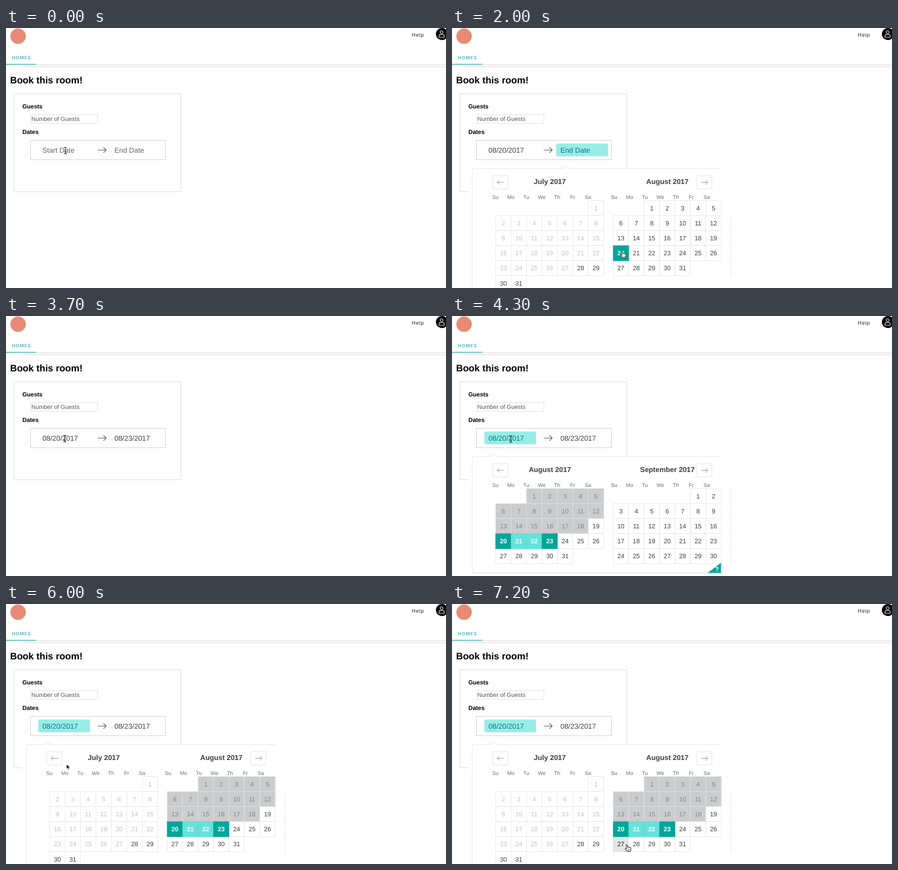
These frames come from a looping animation (912 px wide and 540 px high, 7300 ms). An HTML page:

```html
<!DOCTYPE html>
<html lang="en">
<head>
<meta charset="utf-8">
<title>Book this room</title>
<style>
html, body { margin: 0; width: 100%; height: 100%; overflow: hidden; background: #fff; }
svg { display: block; width: 912px; height: 540px; font-family: "Liberation Sans", Arial, sans-serif; text-rendering: geometricPrecision; }
.round { font-family: Inter, sans-serif; }
</style>
</head>
<body>
<svg viewBox="0 0 912 540" xmlns="http://www.w3.org/2000/svg">
  <defs>
    <clipPath id="panel"><rect x="73" y="293" width="508" height="247"/></clipPath>
  </defs>
  <rect width="912" height="540" fill="#fff"/>
  <circle cx="25" cy="17" r="16" fill="#e98a74"/>
  <text class="round" x="841" y="17.5" font-size="10.5" font-weight="500" letter-spacing=".65" fill="#484848">Help</text>
  <circle cx="903.5" cy="12.5" r="12.5" fill="#000"/>
  <g fill="none" stroke="#fff" stroke-width="1.1">
    <circle cx="903" cy="8.6" r="2.9"/>
    <path d="M897.5 19.2v-2.6a3 3 0 0 1 3-3h5a3 3 0 0 1 3 3v2.6z"/>
  </g>
  <text class="round" x="12" y="64.5" font-size="9.5" font-weight="700" letter-spacing=".9" fill="#62bcc2">HOMES</text>
  <path d="M0 76.5H912M25 80.5H912" stroke="#d2d2d2"/>
  <rect y="74.4" width="63" height="2" fill="#6cc3c9"/>
  <text x="8.5" y="115" font-size="19.6" font-weight="bold">Book this room!</text>
  <rect x="16.5" y="137" width="346" height="203" fill="none" stroke="#d6d6d6"/>
  <g font-size="12.3" font-weight="bold"><text x="34" y="167">Guests</text><text x="34" y="220">Dates</text></g>
  <rect x="51" y="180" width="139.5" height="18" fill="#fff" stroke="#dedede"/>
  <text x="52.5" y="193.3" font-size="12.3" fill="#555">Number of Guests</text>
  <rect x="50.5" y="233.5" width="280" height="40" fill="#fff" stroke="#cacccd"/>
  <path d="M190 253.5h17.5M202 248l5.7 5.5l-5.7 5.5" fill="none" stroke="#484848" stroke-width="1.1"/>
  <g id="view"></g>
</svg>
<script>
const LOOP = 7300, STEP = 100;
const OPEN = 500, PICK_START = 1900, PICK_END = 2800, REOPEN = 3850, NAV = 5650, SLIDE = 250;
const CELL_W = 32, CELL_H = 31.2, TOP = 358.4, LEFT = 90.5, MONTH_W = 243.6;
const MONTHS = ["July", "August", "September", "October"];
const WEEK = ["Su", "Mo", "Tu", "We", "Th", "Fr", "Sa"];
const JUL = 6, AUG = 7;

// time, x, y of the pointer's hot spot
const PATH = [
  [0, 123, 254], [700, 123, 254], [1100, 291, 370], [1450, 378, 444], [1650, 352, 448],
  [1800, 352, 462], [2050, 352, 464], [2450, 446, 467], [2600, 447, 472], [2900, 447, 472],
  [3500, 122, 254], [4500, 122, 255], [5400, 122, 321], [5600, 101, 319], [5900, 101, 319],
  [6400, 335, 448], [6800, 455, 466], [7200, 362, 500], [LOOP, 362, 500]
];

const STYLES = {
  past: ["#fff", "#c0c3c4", "#e4e7e7"],
  blocked: ["#cacccd", "#82888a", "#dfe2e2"],
  open: ["#fff", "#3c3f40", "#e4e7e7"],
  hover: ["#e4e7e7", "#222", "#dcdfdf"],
  ends: ["#00a699", "#fff", "#00a699", "bold"],
  span: ["#66e2da", "#fff", "#4fdcd1", "bold"],
  preview: ["#b2f1ec", "#007a87", "#80e8e0", "bold"]
};

const view = document.getElementById("view");
const ease = u => u * u * (3 - 2 * u);
const clamp = u => Math.max(0, Math.min(1, u));
const inside = (p, x, y, w, h) => p.x >= x && p.x < x + w && p.y >= y && p.y < y + h;

function pointer(t) {
  const i = Math.max(1, PATH.findIndex(k => k[0] >= t));
  const [a, b] = [PATH[i - 1], PATH[i]];
  const u = ease(clamp((t - a[0]) / (b[0] - a[0])));
  return { x: a[1] + (b[1] - a[1]) * u, y: a[2] + (b[2] - a[2]) * u };
}

function stateAt(t) {
  const s = { p: pointer(t) };
  s.open = t >= OPEN && t < PICK_END || t >= REOPEN;
  s.start = t >= PICK_START;
  s.end = t >= PICK_END;
  s.focus = !s.open ? "" : s.start && !s.end ? "end" : "start";
  s.slide = t < REOPEN ? 1 : ease(clamp((t - NAV) / SLIDE));
  s.bottom = 533.5 + CELL_H * s.slide;
  return s;
}

function days(month, x) {
  const first = new Date(2017, month, 1).getDay();
  const count = new Date(2017, month + 1, 0).getDate();
  return Array.from({ length: count }, (_, i) => {
    const n = first + i;
    return { month, day: i + 1, x: x + n % 7 * CELL_W, y: TOP + Math.floor(n / 7) * CELL_H };
  });
}

function kind(d, s, over) {
  const { month, day } = d;
  if (month === JUL && day < 28) return "past";
  if (month === AUG) {
    if (s.start && day === 20 || s.end && day === 23) return "ends";
    if (s.end && day > 20 && day < 23) return "span";
    if (s.focus === "end" && over && over.month === AUG && day > 20 && day <= over.day) return "preview";
    if (s.focus === "start" && day < 19) return "blocked";
  }
  return d === over ? "hover" : "open";
}

function cell(d, s, over) {
  const [bg, ink, line, weight = "normal"] = STYLES[kind(d, s, over)];
  return `<rect x="${d.x}" y="${d.y}" width="${CELL_W}" height="${CELL_H}" fill="${bg}" stroke="${line}"/>` +
    `<text x="${d.x + 16}" y="${d.y + 20.2}" fill="${ink}" font-weight="${weight}">${d.day}</text>`;
}

function navButton(x, dir) {
  const mid = x + 16, tip = mid + 7 * dir;
  return `<rect x="${x}" y="306.8" width="31.5" height="27.5" rx="2" fill="#fff" stroke="#dce0e0"/>` +
    `<path d="M${mid - 7 * dir} 320.5H${tip}M${tip - 4.5 * dir} 316l${4.5 * dir} 4.5l${-4.5 * dir} 4.5" fill="none" stroke="#82888a"/>`;
}

function field(x, value, hint, active) {
  const ink = active ? "#007a87" : value ? "#404040" : "#666";
  return (active ? `<rect x="${x - 8.5}" y="240" width="107" height="26.5" rx="2" fill="#99ede6"/>` : "") +
    `<text x="${x}" y="258.5" font-size="14.75" fill="${ink}">${value || hint}</text>`;
}

function calendar(s) {
  const b = s.bottom, notch = s.focus === "end" ? 235 : 85.5;
  const shift = LEFT - (1 - s.slide) * MONTH_W;
  let grid = "", titles = "", list = [];
  MONTHS.forEach((name, i) => {
    const x = shift + i * MONTH_W;
    list = list.concat(days(JUL + i, x));
    titles += `<text x="${x + 112.3}" y="324">${name} 2017</text>`;
  });
  const over = list.find(d => inside(s.p, d.x, d.y, CELL_W, CELL_H));
  s.hand = over || inside(s.p, 84.5, 307, 32, 28) || inside(s.p, 507, 307, 32, 28);
  const strong = d => /ends|span|preview/.test(kind(d, s, over)) ? 1 : 0;
  list.sort((a, c) => strong(a) - strong(c)).forEach(d => grid += cell(d, s, over));
  const week = [90, 336].map(x => WEEK.map((w, i) =>
    `<text x="${x + i * CELL_W}" y="355">${w}</text>`).join("")).join("");
  return `<rect x="33.5" y="292" width="548" height="248" fill="#fff"/>
    <path d="M558 292H45a3 3 0 0 0 -3 3V${b - 3}a3 3 0 0 0 3 3H558" fill="none" stroke="#e2e2e2"/>
    <path d="M44 ${b + 1}H558" stroke="#f1f1f1"/>
    <path d="M${notch - 8} 292.6l8 -6.6l8 6.6" fill="#fff" stroke="#e2e2e2"/>
    <g clip-path="url(#panel)" text-anchor="middle">
      <g font-size="13.1">${grid}</g>
      <g font-size="14.75" font-weight="bold" fill="#3c3f40">${titles}</g>
      <g font-size="10.9" fill="#6a6d6e">${week}</g>
      ${navButton(84.7, -1)}${navButton(507.2, 1)}
      <path d="M530 ${b}H557.5V${b - 21}z" fill="#00a699"/>
      <text x="549.3" y="${b - 3.3}" font-size="13" font-weight="bold" fill="#fff">?</text>
    </g>`;
}

function cursor(s) {
  const { p } = s;
  const at = `transform="translate(${p.x.toFixed(2)} ${p.y.toFixed(2)})"`;
  if (s.hand) return `<path ${at} fill="#fff" stroke="#222" stroke-width="1.1" stroke-linejoin="round"
    d="M-1 .8Q0 -.8 1.2 .8L2.4 5.2Q3.6 4 4.7 5.2Q5.9 4.4 6.8 5.8Q8.4 5.2 8.8 7V10.2L7.6 13.6H1.2L-2.8 8.6Q-2.8 6.7 -1 7.4L.3 8.3z"/>
    <path ${at} d="M2.8 9.2v2.5M4.7 9.2v2.5M6.5 9.2v2.5" stroke="#222" stroke-width=".7"/>`;
  if (inside(p, 67, 234, 107, 39) || inside(p, 217, 234, 106, 39))
    return `<path ${at} d="M-3 -6.5Q0 -6.5 0 -4.5Q0 -6.5 3 -6.5M0 -4.5V5.5M-3 7.5Q0 7.5 0 5.5Q0 7.5 3 7.5M-1.6 3.2H1.6" fill="none" stroke="#222" stroke-width="1.2"/>`;
  return `<path ${at} d="M0 0V10.4L2.4 8.2L4 12L5.9 11.2L4.3 7.5H7.5z" fill="#111" stroke="#fff" stroke-width=".8"/>`;
}

function draw(t) {
  const s = stateAt(t);
  view.innerHTML =
    field(75.5, s.start && "08/20/2017", "Start Date", s.focus === "start") +
    field(224.7, s.end && "08/23/2017", "End Date", s.focus === "end") +
    (s.open ? calendar(s) : "") + cursor(s);
}

let origin = null, last = -1;
function tick(now) {
  if (origin === null) origin = now;
  const t = Math.floor((now - origin) % LOOP / STEP) * STEP;
  if (t !== last) draw(last = t);
  requestAnimationFrame(tick);
}
draw(0);
requestAnimationFrame(tick);
</script>
</body>
</html>
```
